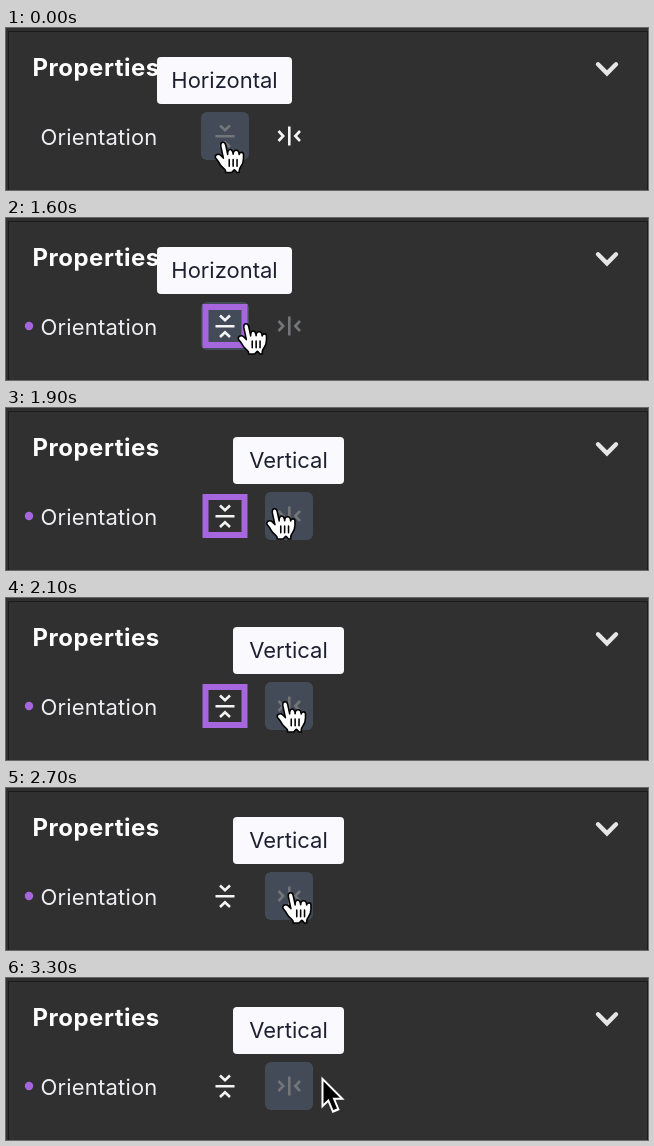
These frames come from a looping animation (642x162 px, 3400 ms). An HTML page:

```html
<!DOCTYPE html>
<html lang="en">
<head>
<meta charset="utf-8">
<title>Orientation property</title>
<style>
  html, body { margin: 0; width: 100%; height: 100%; overflow: hidden; background: #303030; }
  svg { display: block; width: 642px; height: 162px; }
  text { font: 22px Inter, "Open Sans", sans-serif; fill: #1d2030; }
  .tip rect { fill: #f9f9fe; }
  .tip text { text-anchor: middle; }
  .icon { fill: none; stroke: #f4f4f4; stroke-width: 2.6; }
  .dim { stroke: #747578; }
  .hover { fill: #444b58; }
</style>
</head>
<body>
<svg viewBox="0 0 642 162">
  <defs>
    <path id="collapse" d="M-9.5 .3H9.5M-5-10.5 0-5.8 5-10.5M-5 11 0 6.3 5 11"/>
  </defs>
  <path d="M2 3.5H642M2.5 3V162M641.5 3V162" stroke="#1b1b1b"/>

  <text x="26.5" y="48.3" style="font-size:24px;font-weight:700;letter-spacing:.5px;fill:#fff">Properties</text>
  <path d="M592 36.3 601 45.3 610 36.3" fill="none" stroke="#e6e6e6" stroke-width="4.4" stroke-linecap="round"/>
  <text x="34.5" y="116.6" style="letter-spacing:.2px;fill:#ededf2">Orientation</text>
  <circle id="dot" cx="23" cy="108" r="4.2" fill="#a667de"/>

  <rect id="hoverH" class="hover" x="195" y="84" width="48" height="48" rx="6"/>
  <rect id="hoverV" class="hover" x="259" y="84" width="48" height="48" rx="6"/>
  <rect id="frame" x="199.5" y="89" width="39" height="38" fill="none" stroke="#a667de" stroke-width="6"/>
  <use id="iconH" class="icon" href="#collapse" transform="translate(219 108)"/>
  <use id="iconV" class="icon" href="#collapse" transform="translate(283 108) rotate(-90)"/>

  <g id="tipH" class="tip">
    <rect x="151" y="29" width="135" height="47" rx="4"/>
    <text x="218.5" y="60.3">Horizontal</text>
  </g>
  <g id="tipV" class="tip">
    <rect x="227" y="29" width="111" height="47" rx="4"/>
    <text x="282.5" y="60.3">Vertical</text>
  </g>

  <g id="hand">
    <g transform="scale(1.95) translate(-12.4 -8)" stroke="#000" stroke-width=".8" stroke-linecap="round" stroke-linejoin="round">
      <path fill="#fff" d="M11.3 20.4 10.1 18.4 8.6 16.5C7.9 15.2 9.6 13.7 11.3 15.1L12.6 16.5 11.3 10.5C10.9 8 13.2 7.7 13.8 9.8L14.8 14.6C14.5 11.4 17.5 11.3 17.6 14.5 17.7 11.8 20.5 11.7 20.7 14.6 21 13.2 22.9 13.2 22.9 14.7V16.7C22.9 20.9 20.7 20.6 20.7 23L20.8 23.9H19.6L18.6 22.8Q18.2 22.3 17.9 22.8L16.8 23.9H13.7Q13.9 22.8 13.5 22.5Z"/>
      <path d="M19.6 20.7V17.3M17.6 20.7V17.2M15.6 17.3V20.7"/>
    </g>
  </g>
  <g id="arrow">
    <g transform="scale(2) translate(-8.2 -4.9)">
      <path fill="#fff" d="M8.2 20.9V4.9L19.8 16.5H13L12.6 16.6ZM17.3 21.6 13.7 23.1 9 12 12.7 10.5Z"/>
      <path d="M9.2 7.3V18.5L12.2 15.6 12.6 15.5H17.4Z"/>
      <rect x="12.5" y="13.6" width="2" height="8" transform="matrix(.9221 -.3871 .3871 .9221 -5.76 6.59)"/>
    </g>
  </g>
</svg>
<script>
const LOOP = 3400;
const $ = id => document.getElementById(id);

// pointer path: start time, x, y, shape
const steps = [
  [0, 217, 113.5, "hand"],
  [1500, 224, 112, "hand"],
  [1600, 240, 105, "hand"],
  [1700, 256, 97.5, "arrow"],
  [1800, 263, 99, "hand"],
  [1900, 268.5, 100, "hand"],
  [2000, 273, 101, "hand"],
  [2100, 279, 103, "hand"],
  [2200, 282.5, 104, "hand"],
  [2300, 283.5, 104, "hand"],
  [2600, 284.5, 104, "hand"],
  [3100, 288, 103.5, "hand"],
  [3200, 299, 101.5, "hand"],
  [3300, 315.5, 98.5, "arrow"]
];

function show(id, on) {
  $(id).style.display = on ? "" : "none";
}

function draw(now) {
  const t = now % LOOP;
  const chosen = t >= 1200;
  show("dot", chosen);
  show("frame", chosen && t < 2600);
  show("hoverH", t < 1700);
  show("tipH", t < 1700);
  show("hoverV", t >= 1800);
  show("tipV", t >= 1900);
  $("iconH").classList.toggle("dim", !chosen);
  $("iconV").classList.toggle("dim", chosen);

  const [, x, y, shape] = steps.findLast(s => s[0] <= t);
  for (const id of ["hand", "arrow"]) show(id, id === shape);
  $(shape).setAttribute("transform", `translate(${x} ${y})`);
}

const start = performance.now();
function tick() {
  draw(performance.now() - start);
  requestAnimationFrame(tick);
}
tick();
</script>
</body>
</html>
```
